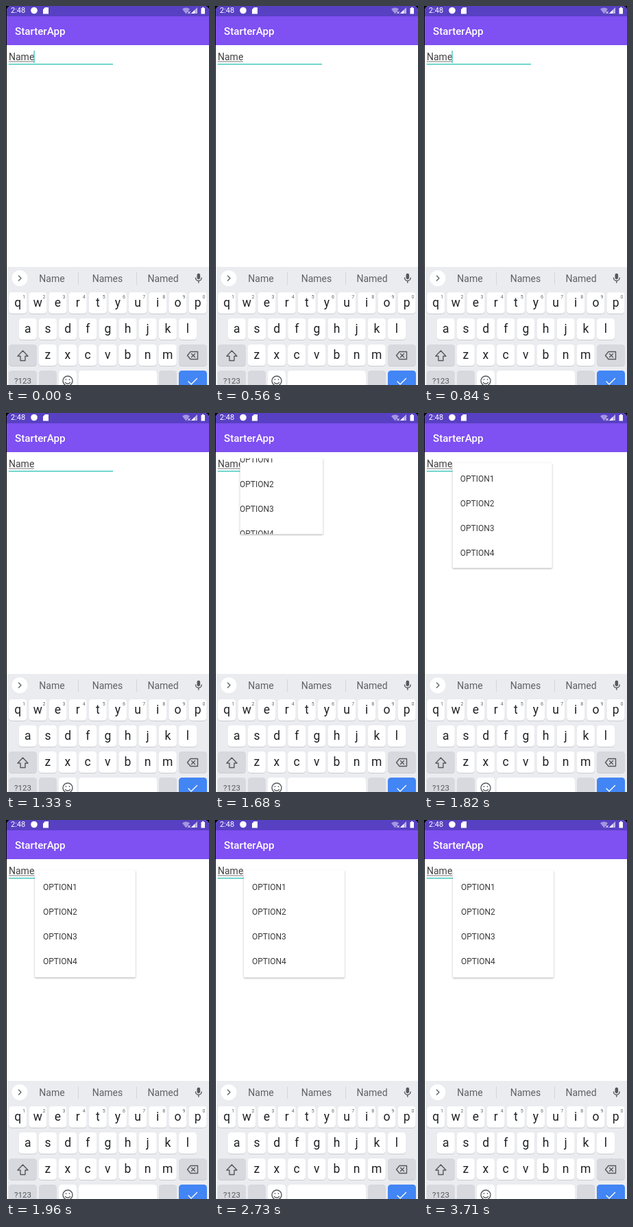
An HTML page that plays this animation: 296x552 px, repeating every 3.78 s.

```html
<!DOCTYPE html>
<html lang="en">
<head>
<meta charset="utf-8">
<style>
  html, body { margin: 0; width: 100%; height: 100%; overflow: hidden; background: #000; }
  #stage { display: block; width: 296px; height: 552px; font-family: Roboto, sans-serif; }
  .line { fill: none; stroke-width: 1.4; stroke-linecap: round; stroke-linejoin: round; }
  #keys text, #suggestions text { text-anchor: middle; }
  #suggestions { font-size: 14px; fill: #5f6165; }
  #options { font-size: 12px; fill: #3b3b3b; }
  #panel { filter: drop-shadow(0 1px 1.3px rgba(0, 0, 0, .32)); }
</style>
</head>
<body>
<svg id="stage" viewBox="0 0 296 552">
  <defs><clipPath id="screen"><rect x="1" width="295" height="580" rx="7"/></clipPath></defs>
  <rect width="296" height="552" fill="#000"/>
  <g clip-path="url(#screen)">
    <rect width="296" height="552" fill="#fff"/>
    <rect width="296" height="57" fill="#7f50f2"/>
    <rect width="296" height="15" fill="#5840c3"/>

    <!-- status bar -->
    <g fill="#fff">
      <text x="7" y="10.3" font-size="11">2:48</text>
      <circle cx="41" cy="6.5" r="4.8"/>
      <path d="M57 2h5v9.500h-8V5z"/>
      <path d="M257 4.500q5.500-4 11 0l-5.500 7z" opacity=".45"/>
      <path d="M270 11l9-9v9z" opacity=".6"/>
      <path d="M270 11l5-5v5z"/>
      <path d="M284.500 3h1.500v-1.300h2.500V3h1.500v8.500h-5.500z"/>
    </g>
    <path class="line" stroke="#fff" d="M265.500 8l3 3m0-3l-3 3" style="stroke-width:1"/>

    <text x="13" y="42" font-size="15.200" font-weight="500" fill="#fff">StarterApp</text>

    <!-- text field -->
    <text x="4" y="79" font-size="14" fill="#404040">Name</text>
    <rect x="4" y="80.500" width="37" height="1" fill="#777"/>
    <rect x="4" y="84" width="152" height="1.500" fill="#45c9bf"/>
    <rect id="cursor" x="40.400" y="65" width="1.400" height="18" fill="#45c9bf"/>

    <!-- popup menu -->
    <g id="popup">
      <rect id="panel" rx="1.500" fill="#fff"/>
      <svg id="view"><g id="options"></g></svg>
    </g>

    <!-- keyboard -->
    <rect y="380" width="296" height="172" fill="#ebecf0"/>
    <g id="suggestions">
      <text x="67" y="402">Name</text>
      <text x="148" y="402">Names</text>
      <text x="229" y="402">Named</text>
      <path d="M105.500 388v18M190.500 388v18" stroke="#d3d5d9"/>
      <circle cx="20" cy="396.500" r="11.500" fill="#fff"/>
      <path class="line" d="M18.500 393l3.500 3.500l-3.500 3.500" stroke="#5f6368"/>
      <rect x="278.500" y="389.500" width="4.600" height="8.500" rx="2.300" fill="#55585d"/>
      <path class="line" d="M276.500 396a4.300 4.300 0 0 0 8.600 0M280.800 400.500v2.500" stroke="#55585d"/>
    </g>
    <g id="keys"></g>
    <g class="line" stroke="#55585d">
      <path d="M24.500 502l-7.500 8h4v6.500h7V510h4z"/>
      <path d="M269 503.500h10.500v11H269l-4.500-5.500zM270.500 506.500l5 5m0-5l-5 5"/>
      <circle cx="90" cy="546" r="7"/>
      <path d="M86.500 548.500q3.500 3.500 7 0M87.500 543.800v.4M92.500 543.800v.4"/>
      <path d="M266 547l4 4l8.500-8.500" stroke="#fff"/>
    </g>
  </g>
</svg>
<script>
const LOOP = 3780, STEP = 70, OPEN = 1680;
const $ = id => document.getElementById(id);

function add(parent, tag, attrs, text = '') {
  const el = document.createElementNS('http://www.w3.org/2000/svg', tag);
  setAll(el, attrs);
  el.textContent = text;
  parent.append(el);
}

function setAll(el, attrs) {
  for (const name in attrs) el.setAttribute(name, attrs[name]);
}

function key(x, y, width, fill = '#fff') {
  const box = { x, width, height: 31, rx: 4.5 };
  add($('keys'), 'rect', { ...box, y: y + 1, fill: '#c9cbd0' });
  add($('keys'), 'rect', { ...box, y, fill });
}

function letterRow(letters, center, y, digits = '') {
  [...letters].forEach((letter, i) => {
    const x = center + i * 29.15;
    key(x - 13, y, 26);
    add($('keys'), 'text', { x, y: y + 21, 'font-size': 17.5, fill: '#202124' }, letter);
    if (digits) add($('keys'), 'text', { x: x + 9, y: y + 8.5, 'font-size': 7, fill: '#5f6368' }, digits[i]);
  });
}

const GRAY = '#d7d9de';
letterRow('qwertyuiop', 17.2, 417, '1234567890');
letterRow('asdfghjkl', 31.8, 455);
letterRow('zxcvbnm', 60.8, 493);
key(4, 493, 41, GRAY);
key(252, 493, 41, GRAY);
key(4, 531, 41, GRAY);
key(48, 531, 26, GRAY);
key(77, 531, 26);
key(106, 531, 114);
key(223, 531, 26, GRAY);
key(252, 531, 41, '#4285f4');
add($('keys'), 'text', { x: 24.5, y: 550, 'font-size': 11.5, fill: '#55585d' }, '?123');

for (let i = 0; i < 4; i++) {
  add($('options'), 'text', { x: 54, y: 102 + 36 * i }, 'OPTION' + (i + 1));
}

function draw(time) {
  const t = Math.floor(time % LOOP / STEP) * STEP;
  const cursorOn = t < 280 || (t >= 840 && t < 1330);
  $('cursor').style.display = cursorOn ? '' : 'none';
  $('popup').style.display = t >= OPEN ? '' : 'none';

  // the menu settles with a decelerating reveal
  const rest = Math.exp((OPEN - t) / 53);
  const x = 42 - 5.5 * rest, y = 73 - 7 * rest;
  const box = { x, y, width: 147 - 26 * rest, height: 156.5 - 46 * rest };
  setAll($('panel'), box);
  setAll($('view'), box);
  $('options').setAttribute('transform', `translate(${-18 * rest - x} ${-30 * rest - y})`);
}

const start = performance.now();
function tick() {
  draw(performance.now() - start);
  requestAnimationFrame(tick);
}
tick();
</script>
</body>
</html>
```
